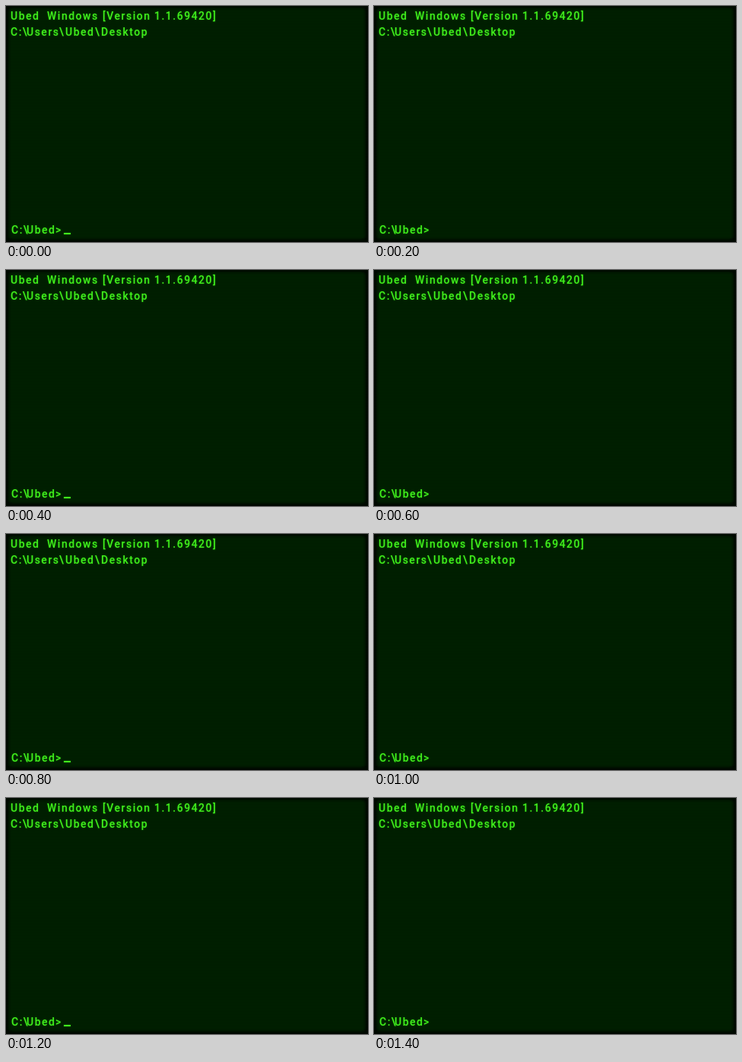
An HTML page for the animation above (1.6 s loop, 476x310 px).

```html
<!DOCTYPE html>
<html lang="en">
<head>
<meta charset="utf-8">
<title>Terminal</title>
<style>
  html, body { margin: 0; width: 100%; height: 100%; overflow: hidden; background: #000; }
  svg { display: block; width: 476px; height: 310px; }
  text {
    font: 500 14px Roboto, "Liberation Sans", sans-serif;
    letter-spacing: 1.5px;
    fill: #42f01c;
    white-space: pre;
  }
  .glow { filter: drop-shadow(0 0 1px #0a6a06); }
</style>
</head>
<body>
<svg viewBox="0 0 476 310">
  <defs>
    <pattern id="lines" width="2" height="2" patternUnits="userSpaceOnUse">
      <rect width="2" height="1" fill="#001600" opacity=".55"/>
    </pattern>
    <filter id="soft" x="-5%" y="-5%" width="110%" height="110%">
      <feGaussianBlur stdDeviation="1.5"/>
    </filter>
  </defs>
  <rect width="476" height="310" fill="#000300"/>
  <rect x="4" y="3" width="468" height="303" rx="4" fill="#002400" filter="url(#soft)"/>
  <rect width="476" height="310" fill="url(#lines)"/>
  <g class="glow">
    <text y="18"><tspan x="6">Ubed</tspan><tspan x="49"> Windows</tspan><tspan x="127">[Version</tspan><tspan x="195">1.1.69420]</tspan></text>
    <text y="39"><tspan x="6">C:\</tspan><tspan x="27">Users</tspan><tspan x="70">\</tspan><tspan x="78">Ubed</tspan><tspan x="117">\</tspan><tspan x="125">Desktop</tspan></text>
    <text y="299"><tspan x="7">C:\</tspan><tspan x="27">Ubed</tspan><tspan x="65">&gt;</tspan></text>
    <rect id="cursor" x="76" y="298" width="9" height="2" fill="#42f01c"/>
  </g>
</svg>
<script>
  const cursor = document.getElementById("cursor");
  const blink = 200;

  // The cursor is lit during every even interval.
  function draw(now) {
    const lit = Math.floor(now / blink) % 2 === 0;
    cursor.setAttribute("visibility", lit ? "visible" : "hidden");
    requestAnimationFrame(tick);
  }

  let start;
  function tick(now) {
    start ??= now;
    draw(now - start);
  }
  requestAnimationFrame(tick);
</script>
</body>
</html>
```
